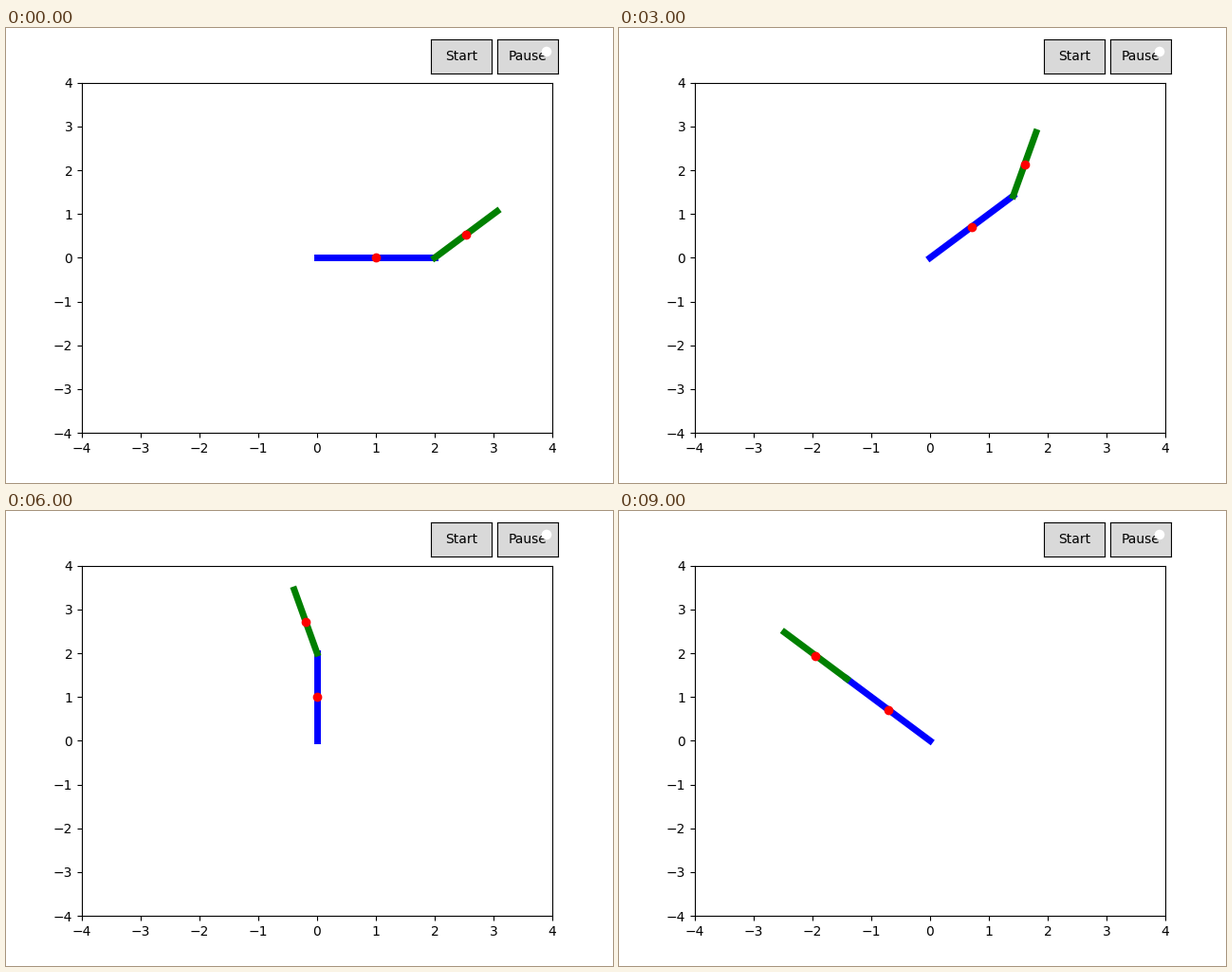
Animation, 640 px wide and 480 px high, one loop 10 s. Source, as a matplotlib script:

```python
import numpy as np
import matplotlib.pyplot as plt
from matplotlib.animation import FuncAnimation
from matplotlib.patches import Circle

FRAMES = 10
INTERVAL = 1000
L1, L2 = 2.0, 1.5

plt.rcParams["font.family"] = "DejaVu Sans"
fig = plt.figure(figsize=(6.4, 4.8), dpi=100)
ax = fig.add_axes([0.125, 0.11, 0.775, 0.77])
ax.set(xlim=(-4, 4), ylim=(-4, 4))


def button(x, label):
    box = fig.add_axes([x, 0.9, 0.1, 0.075], facecolor="0.85")
    box.set(xticks=[], yticks=[])
    box.text(0.5, 0.5, label, ha="center", va="center",
             transform=box.transAxes)
    return box


button(0.7, "Start")
pause = button(0.81, "Pause")

# Pointer spot resting on the Pause button, in pixels from the bottom left
pause.add_patch(Circle((570, 480 - 25), 5.3, fc="white", ec="none",
                       transform=None, zorder=5))

upper, = ax.plot([], [], color="blue", lw=5)
lower, = ax.plot([], [], color="green", lw=5)
centers, = ax.plot([], [], "ro")


def draw(i):
    a = np.radians(15 * i)
    b = a + np.radians(45 - 5 * i)
    elbow = L1 * np.array([np.cos(a), np.sin(a)])
    tip = elbow + L2 * np.array([np.cos(b), np.sin(b)])
    upper.set_data([0, elbow[0]], [0, elbow[1]])
    lower.set_data([elbow[0], tip[0]], [elbow[1], tip[1]])
    centers.set_data(*np.transpose([elbow / 2, (elbow + tip) / 2]))
    return upper, lower, centers


anim = FuncAnimation(fig, draw, frames=FRAMES, interval=INTERVAL,
                     init_func=lambda: draw(0), repeat=True, repeat_delay=0)
plt.show()
```
